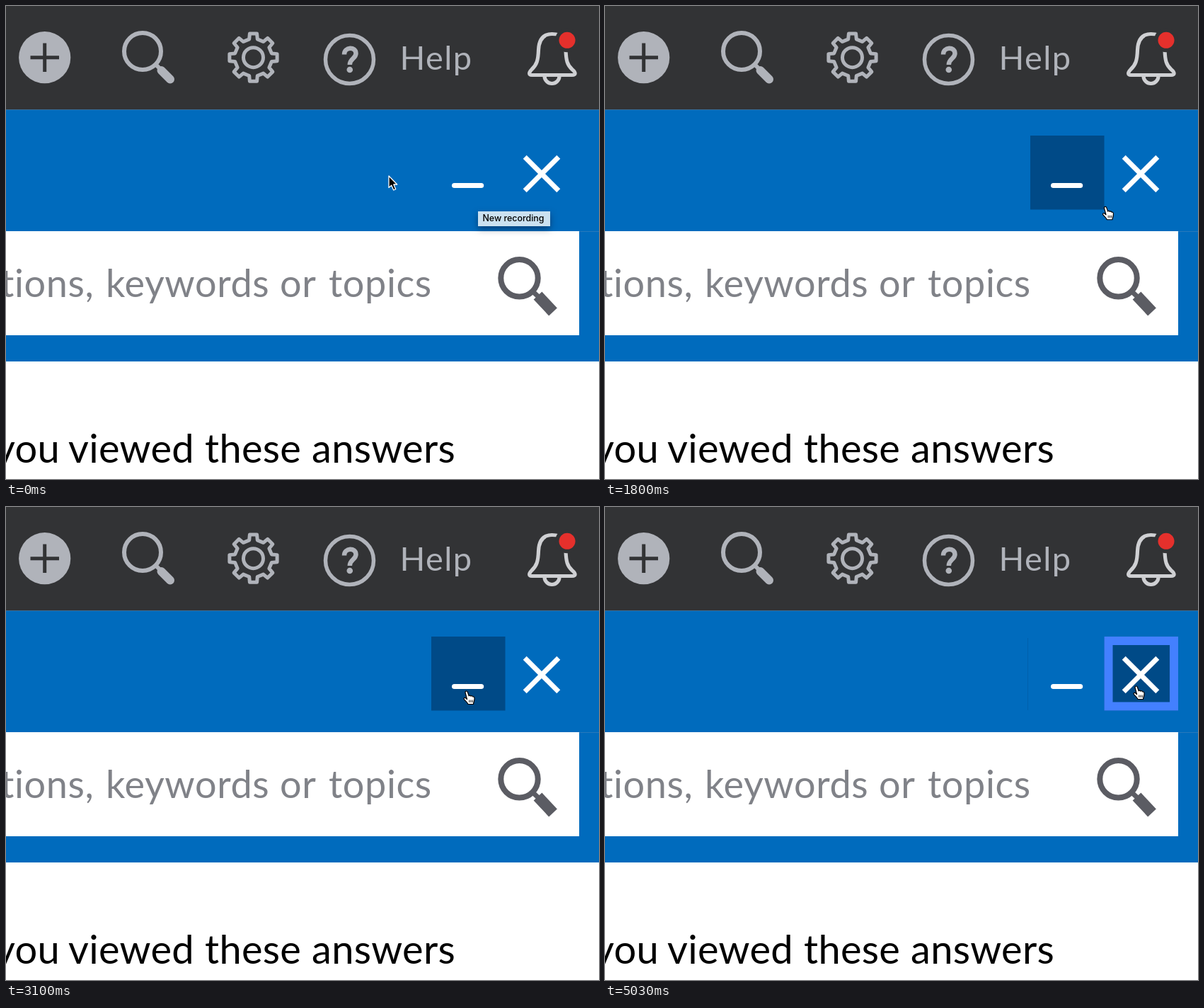
These frames come from a looping animation (838x668 px, 5460 ms). An HTML page:

```html
<!DOCTYPE html>
<html lang="en">
<head>
<meta charset="utf-8">
<title>Panel controls</title>
<style>
  html, body { margin: 0; width: 100%; height: 100%; overflow: hidden; background: #fff; }
  svg { display: block; width: 838px; height: 668px; }
  text { font-family: Lato, "Open Sans", sans-serif; }
  .icon { fill: none; stroke: #b0b3ba; }
  .white { fill: none; stroke: #fff; stroke-width: 7; }
  .query { font-size: 54px; letter-spacing: .6px; fill: #808288; }
  .heading { font-size: 56px; letter-spacing: .3px; fill: #000; }
  .tip rect { fill: #cbe1f0; filter: drop-shadow(0 4px 5px rgba(0, 20, 50, .5)); }
  .tip text { font: 500 12.4px Inter, sans-serif; fill: #000; }
</style>
</head>
<body>
<svg viewBox="0 0 838 668">
  <rect width="838" height="146" fill="#323335"/>
  <rect y="146" width="838" height="356" fill="#006bbd"/>
  <path d="M0 146.5H838" stroke="#39709c"/>
  <path d="M810 318.5H838" stroke="#2879bb"/>
  <rect y="318" width="810" height="147" fill="#fff"/>

  <!-- toolbar -->
  <circle cx="54.7" cy="72.7" r="36.6" fill="#b0b3ba"/>
  <path d="M34.5 72.7H75M54.7 52.5V93" stroke="#323335" stroke-width="5"/>
  <g class="icon" stroke-width="6">
    <circle cx="193" cy="64" r="26"/>
    <path d="M211 82L220 91"/>
    <path d="M219.5 91L232 103.500" stroke-width="12" stroke-linecap="round"/>
  </g>
  <g class="icon" stroke-width="5" transform="translate(349.5 72.7)">
    <circle r="14"/>
    <path id="gear" stroke-linejoin="round"/>
  </g>
  <circle class="icon" stroke-width="5.5" cx="485.5" cy="75.5" r="34"/>
  <path class="icon" stroke-width="6.5" d="M478 68.500C478 57 494.500 57 494.500 67C494.500 74.500 485.800 74 485.800 83"/>
  <circle cx="485.8" cy="90" r="4.3" fill="#b0b3ba"/>
  <text x="556.5" y="89.5" font-size="47" letter-spacing="1.4" fill="#b0b3ba">Help</text>
  <g fill="none" stroke="#cfd0d3" stroke-width="5.2">
    <path d="M782 41Q777 39.500 771.500 39.500C757 39.500 753 50 752.500 62C752 77 750 83 743 89.500C738 94.500 739 97.500 743 97.500H800C805 97.500 806 94.500 800 89.500C793 83 791.500 77 791 62"/>
    <path d="M761 99A10.500 10.500 0 0 0 782 99"/>
  </g>
  <circle cx="793" cy="48.3" r="17" fill="#323335"/>
  <circle cx="793" cy="48.3" r="11.5" fill="#e5302c"/>

  <!-- window controls -->
  <path id="trace" d="M597.500 185V287" stroke="#004a87" opacity=".3"/>
  <g id="hover">
    <rect y="183" width="104.5" height="104.5" fill="#004a87"/>
    <rect id="ring" x="6" y="189" width="92.5" height="92.5" fill="none" stroke="#4380ff" stroke-width="12"/>
  </g>
  <path class="white" stroke-linecap="round" d="M633.500 253.500H671.700"/>
  <path class="white" d="M733.200 213.200L780.800 260.800M780.800 213.200L733.200 260.800"/>

  <!-- search field and heading -->
  <text class="query" y="411"><tspan x="-8">tions,</tspan> <tspan x="141">keywords</tspan> <tspan x="387">or</tspan> <tspan x="456">topics</tspan></text>
  <g fill="none" stroke="#5b5c63">
    <circle cx="725.5" cy="384.3" r="26.2" stroke-width="8"/>
    <path d="M743 402L754 412" stroke-width="7"/>
    <path d="M751.500 409L773 432" stroke-width="16"/>
  </g>
  <text class="heading" y="645"><tspan x="-16">you</tspan> <tspan x="88">viewed</tspan> <tspan x="281">these</tspan> <tspan x="432">answers</tspan></text>

  <g id="tip" class="tip">
    <rect x="667" y="290" width="102" height="21"/>
    <text x="673.5" y="304">New recording</text>
  </g>
  <g stroke-linejoin="round" id="cursor">
    <path id="arrow" d="M0 0V16.500L3.700 13.200L6.700 20L9.700 18.700L6.800 12H11.700Z" fill="#000" stroke="#fff" stroke-width="1.3"/>
    <g id="hand" stroke="#000" stroke-width="1.2">
      <path fill="#fff" d="M-2 2C-2.300 -.3 .6 -.7 1.300 1.300L3.200 6.800C3.700 5.700 5.500 5.800 6 7.200C6.700 6.300 8.300 6.700 8.700 8C9.700 7.400 11 8.200 11 10C11.300 13.500 9.800 15 9.500 18.500H2C.5 15 -2.500 13.500 -3.800 11.200C-4.500 9.500 -2.300 8.600 -1 10.200L.5 11.500Z"/>
      <path fill="none" stroke-width=".9" d="M3.800 12.500V16M6 12.500V16M8.200 12.500V16"/>
    </g>
  </g>
</svg>
<script>
const LOOP = 5460, STEP = 100 / 3;
const SWAP = 466, CLICK = 3299;
const BUTTON = 104.5, MINIMISE = 601, CLOSE = MINIMISE + BUTTON;
const $ = id => document.getElementById(id);

// Each move eases out with the given power; sag bends its course downwards.
const start = { x: 541, y: 240 };
const moves = [
  { from: 0, to: 300, x: 480, y: 240, power: 2 },
  { from: 434, to: SWAP, x: 486, y: 243, power: 1 },
  { from: 837, to: 1370, x: 660, y: 259, power: 2 },
  { from: 1600, to: 2233, x: 775, y: 246, power: 1.4, sag: 32 },
  { from: 2610, to: 3100, x: 651, y: 260, power: .8, sag: 35 },
  { from: 3867, to: 4070, x: 562, y: 262, power: 2 },
  { from: 4400, to: 4870, x: 751, y: 253, power: 3.6, sag: 7 }
];

function pointerAt(time) {
  let { x, y } = start;
  for (const move of moves) {
    if (time <= move.from) break;
    const u = Math.min(1, (time - move.from) / (move.to - move.from));
    const eased = 1 - (1 - u) ** move.power;
    x += (move.x - x) * eased;
    y += (move.y - y) * eased + (move.sag || 0) * Math.sin(Math.PI * eased) ** 2;
  }
  return { x, y };
}

function gearPath(teeth = 8) {
  const points = [];
  for (let i = 0; i < teeth; i++) {
    for (const [radius, offset] of [[26.5, -.22], [34, -.15], [34, .15], [26.5, .22]]) {
      const angle = i * 2 * Math.PI / teeth + offset;
      points.push(`${radius * Math.sin(angle)} ${-radius * Math.cos(angle)}`);
    }
  }
  return `M${points.join("L")}Z`;
}

function show(id, visible) {
  $(id).style.display = visible ? "" : "none";
}

function hoveredButton({ x, y }) {
  const inRow = y >= 183 && y <= 183 + BUTTON;
  return inRow && [MINIMISE, CLOSE].find(left => x >= left && x < left + BUTTON);
}

function draw(time) {
  const t = Math.floor((time + 3.4) / STEP) * STEP;
  const { x, y } = pointerAt(t);
  $("cursor").setAttribute("transform", `translate(${x} ${y})`);
  show("arrow", t < SWAP);
  show("hand", t >= SWAP);

  // The button reacts one step after the pointer.
  const left = hoveredButton(pointerAt(t - STEP));
  show("hover", left);
  if (left) $("hover").setAttribute("transform", `translate(${left} 0)`);
  show("ring", t >= CLICK);
  show("trace", t >= 4600);
  $("tip").style.opacity = Math.max(0, 1 - t / 270);
}

$("gear").setAttribute("d", gearPath());
const began = performance.now();
function tick() {
  draw((performance.now() - began) % LOOP);
  requestAnimationFrame(tick);
}
tick();
</script>
</body>
</html>
```
